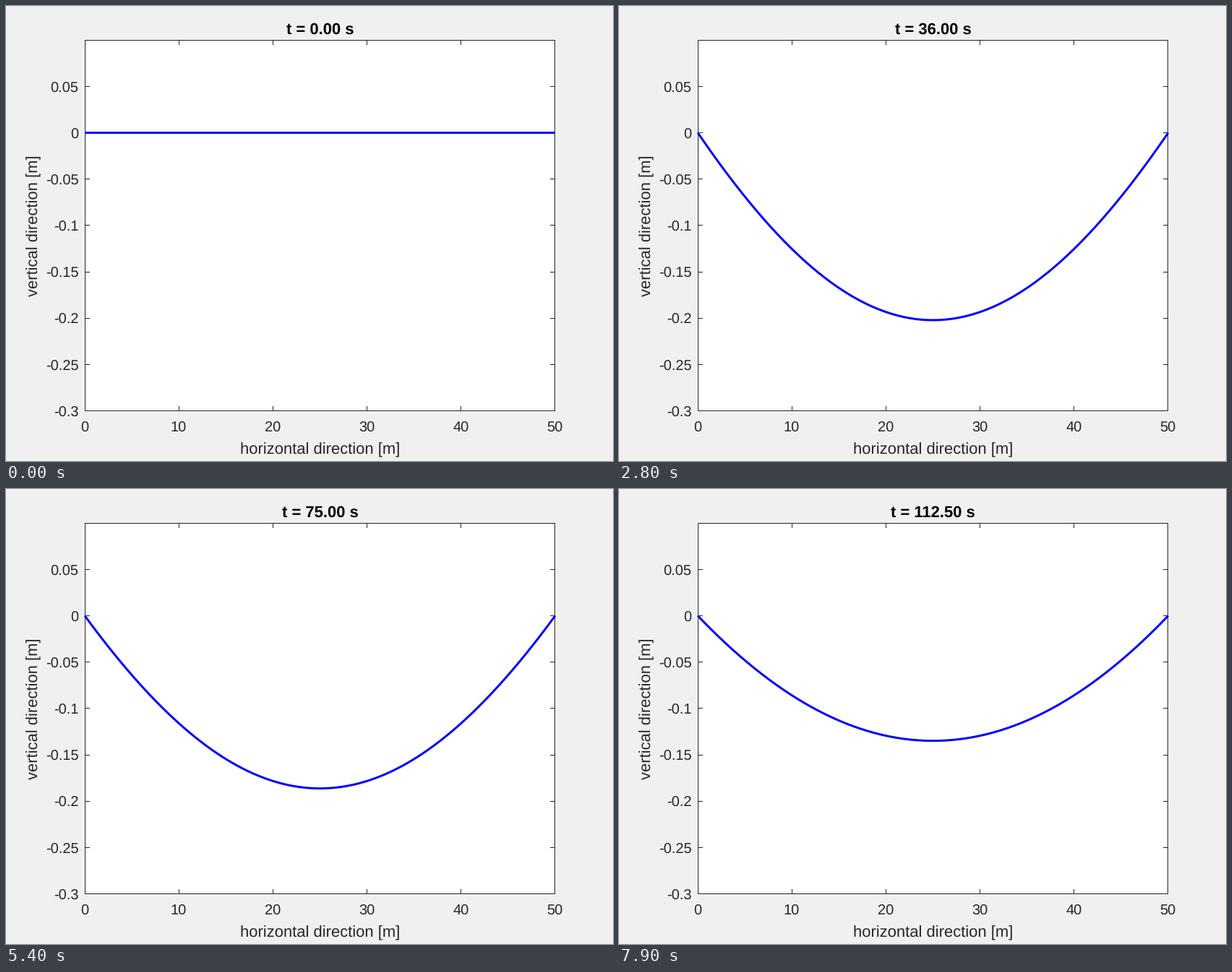
These frames come from a looping animation (840x630 px, 8 s). A matplotlib script:

```python
import numpy as np
import matplotlib.pyplot as plt
from matplotlib.animation import FuncAnimation
from matplotlib.patches import Rectangle

plt.rcParams["font.family"] = "Liberation Sans"
plt.rcParams["text.hinting"] = "none"

W, H, DPI = 840, 630, 100
PT = 72 / DPI                                   # points per pixel
LEFT, RIGHT, TOP, BOTTOM = 109, 760, 47.15, 560.6
INK = "#262626"

# Damped string that sags under a load switched on at t = 0
SPAN = 50.0       # m
SAG = 0.1248      # m, final deflection at midspan
FREQ = 1.567      # Hz, first mode
DECAY = 0.0097    # 1/s, first mode; grows with n squared
STEP = 1.5        # s of motion per frame
HOLD = 4          # extra frames at rest before the start

x = np.linspace(0, SPAN, 201)
modes = np.arange(1, 100, 2)
shapes = 32 / (np.pi * modes[:, None]) ** 3 * np.sin(np.pi * modes[:, None] * x / SPAN)
rest = 4 * x / SPAN * (1 - x / SPAN)


def deflection(t):
    swing = np.exp(-DECAY * modes**2 * t) * np.cos(2 * np.pi * FREQ * modes * t)
    return -SAG * (rest - swing @ shapes)


def px(v):
    return LEFT + (RIGHT - LEFT) * v / SPAN


def py(v):
    return TOP + (BOTTOM - TOP) * (0.1 - v) / 0.4


fig = plt.figure(figsize=(W / DPI, H / DPI), dpi=DPI, facecolor="#f0f0f0")
ax = fig.add_axes([0, 0, 1, 1])
ax.set_xlim(0, W)
ax.set_ylim(H, 0)
ax.axis("off")


def stroke(x0, y0, x1, y1):
    ax.plot([x0, x1], [y0, y1], color=INK, lw=PT, solid_capstyle="butt",
            snap=False, zorder=2)


def label(x0, y0, s, size=20, **kw):
    kw = {"ha": "center", "va": "baseline", "color": INK, **kw}
    return ax.text(x0, y0, s, fontsize=size * PT, **kw)


# Plot box, centred on pixel rows and columns
L, R, T, B = 109.5, 759.5, 47.5, 560.5
ax.add_patch(Rectangle((L, T), R - L, B - T, fc="white", ec="none",
                       snap=False, zorder=1))
for y0 in (T, B):
    stroke(L - 0.5, y0, R + 0.5, y0)
for x0 in (L, R):
    stroke(x0, T + 0.5, x0, B - 0.5)

for i in range(6):
    xt = L + 130 * i
    if 0 < i < 5:
        stroke(xt, T + 0.5, xt, T + 6.5)
        stroke(xt, B - 0.5, xt, B - 6.5)
    label(px(10 * i) - 0.6, 590, str(10 * i))

for i in range(-6, 2):
    v = i * 0.05
    yt = np.floor(py(v)) + 0.5
    if i > -6:
        stroke(L + 0.5, yt, L + 6.5, yt)
        stroke(R - 0.5, yt, R - 6.5, yt)
    label(100.4, py(v) + 8, f"{v:g}", ha="right")

label(434.6, 620, "horizontal direction [m]", 22)
label(44, 304, "vertical direction [m]", 22, rotation=90, rotation_mode="anchor")

title = label(434.6, 39, "", 22, color="black", weight="bold")
curve, = ax.plot([], [], color="#0000ff", lw=3 * PT, solid_capstyle="butt",
                 solid_joinstyle="round", clip_on=False, snap=False, zorder=3)


def draw(frame):
    t = STEP * max(0, frame - HOLD)
    curve.set_data(px(x), py(deflection(t)))
    title.set_text(f"t = {t:.2f} s")
    return curve, title


anim = FuncAnimation(fig, draw, frames=80, interval=100, repeat=True, repeat_delay=0,
                     init_func=lambda: draw(0), blit=False)
plt.show()
```
